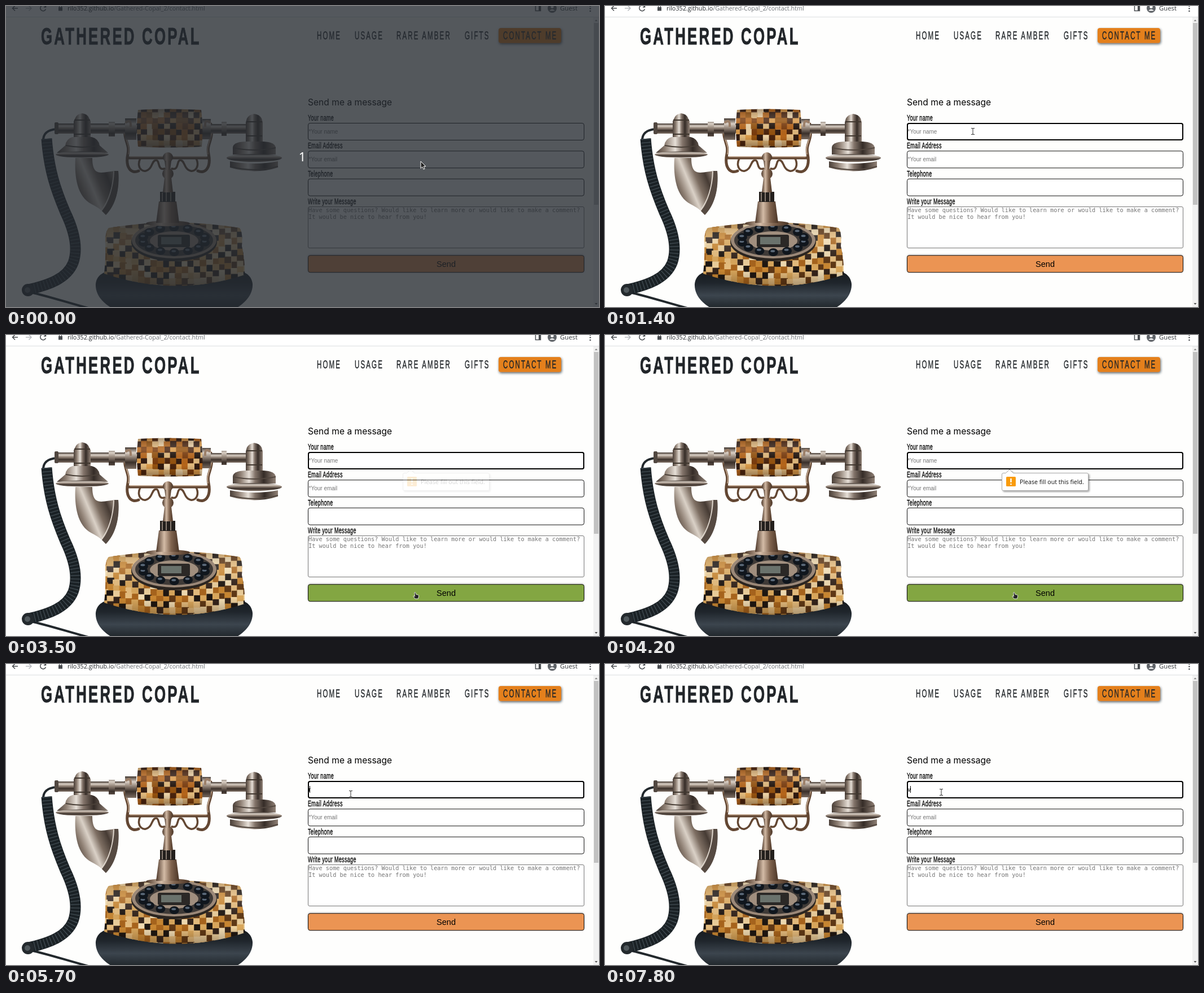
These frames come from a looping animation (1051 px wide and 533 px high, 8000 ms). An HTML page:

```html
<!DOCTYPE html>
<html lang="en">
<head>
<meta charset="utf-8">
<title>Contact form</title>
<style>
  html, body { margin: 0; width: 100%; height: 100%; overflow: hidden; background: #fefefd; }
  svg { display: block; }
  text { white-space: pre; }
  .ui { font-family: "Open Sans", "Noto Sans", sans-serif; }
  .sans { font-family: "Liberation Sans", Arial, sans-serif; }
  .hint { font-size: 10px; fill: #757575; }
  .mono { font: 10.26px "DejaVu Sans Mono", monospace; fill: #757575; }
  /* condensed display face */
  .narrow {
    font-family: "Liberation Sans", Arial, sans-serif;
    transform-box: fill-box; transform-origin: 0 50%; transform: scaleX(.6);
  }
  .label { font-size: 15px; letter-spacing: .55px; stroke: #000; stroke-width: .35px; }
  .nav { font-size: 19.3px; letter-spacing: 3.5px; fill: #212529; stroke: #212529; stroke-width: .4px; }
  .brand { font-size: 43px; font-weight: 700; letter-spacing: 5.4px; fill: #212529; stroke: #212529; stroke-width: 1px; }
  .field { fill: #fff; stroke: #111; }
</style>
</head>
<body>
<svg id="stage" width="1051" height="533" viewBox="0 0 1051 533" xmlns="http://www.w3.org/2000/svg">
  <defs>
    <linearGradient id="steel" x2="0" y2="1">
      <stop offset="0" stop-color="#40362f"/><stop offset=".25" stop-color="#d8cec4"/>
      <stop offset=".45" stop-color="#95867a"/><stop offset=".7" stop-color="#3a302a"/><stop offset="1" stop-color="#7d6e63"/>
    </linearGradient>
    <linearGradient id="column">
      <stop offset="0" stop-color="#4a3f38"/><stop offset=".18" stop-color="#8d7e72"/><stop offset=".38" stop-color="#e6dfd7"/>
      <stop offset=".52" stop-color="#83746a"/><stop offset=".72" stop-color="#352c27"/><stop offset="1" stop-color="#908176"/>
    </linearGradient>
    <linearGradient id="horn" x1="0" y1=".7" x2=".9" y2=".2">
      <stop offset="0" stop-color="#3b322c"/><stop offset=".22" stop-color="#8b7c70"/><stop offset=".42" stop-color="#dad1c7"/>
      <stop offset=".6" stop-color="#7d6e62"/><stop offset=".8" stop-color="#463b34"/><stop offset="1" stop-color="#a09185"/>
    </linearGradient>
    <linearGradient id="bronze">
      <stop offset="0" stop-color="#4b3628"/><stop offset=".35" stop-color="#d3bba6"/>
      <stop offset=".65" stop-color="#80644f"/><stop offset="1" stop-color="#4a3526"/>
    </linearGradient>
    <linearGradient id="shade" x2="0" y2="1">
      <stop offset="0" stop-color="#1a0c04" stop-opacity=".3"/><stop offset=".3" stop-color="#fff" stop-opacity=".16"/>
      <stop offset=".7" stop-color="#1a0c04" stop-opacity="0"/><stop offset="1" stop-color="#1a0c04" stop-opacity=".4"/>
    </linearGradient>
    <linearGradient id="base" x2="0" y2="1">
      <stop offset="0" stop-color="#13171b"/><stop offset=".4" stop-color="#1f252b"/>
      <stop offset=".7" stop-color="#3c454e"/><stop offset="1" stop-color="#20262b"/>
    </linearGradient>
    <filter id="soft" x="-20%" y="-50%" width="140%" height="220%"><feDropShadow dx="1" dy="2" stdDeviation="2.200" flood-color="#1c2730" flood-opacity=".75"/></filter>
    <filter id="faint" x="-10%" y="-30%" width="120%" height="180%"><feDropShadow dx="2" dy="2" stdDeviation="1.5" flood-opacity=".35"/></filter>
    <filter id="glow" x="-2%" y="-30%" width="104%" height="160%"><feDropShadow dx="0" dy="-1" stdDeviation="1.500" flood-opacity=".22"/></filter>
    <clipPath id="gripClip"><path d="M234 184Q290 181 346 184Q350 216 347 249Q290 252 234 249Q230 216 234 184Z"/></clipPath>
    <clipPath id="bodyClip"><path d="M182 393Q298 374 414 393Q420 400 418 425Q424 450 423 476Q300 516 174 474Q177 448 176 425Q175 400 182 393Z"/></clipPath>
    <path id="coil" d="M72 235C76 290 88 325 105 365C122 400 128 430 119 455C108 482 78 494 36 503"/>
  </defs>

  <rect width="1051" height="533" fill="#fefefd"/>

  <!-- browser bar -->
  <rect width="1051" height="19" fill="#fff"/>
  <path d="M0 19.500H1051" stroke="#dcdee1"/>
  <g fill="none" stroke="#4a4d51" stroke-width="1.5">
    <path d="M21 4H11.500M16 -.5L11.500 4L16 8.500"/>
    <path d="M35 4H45M40.500 -.5L45 4L40.500 8.500" stroke="#b9bcc0"/>
    <path d="M70 1A5 5 0 1 0 70.500 5.500M70.500 -1V2H67"/>
    <rect x="938.500" y="-2" width="9" height="10.500"/>
  </g>
  <path d="M944 -2H948V8H944Z M93 2H100V8.500H93Z" fill="#4a4d51"/>
  <path d="M94.500 2V-2H98.500V2" fill="none" stroke="#4a4d51"/>
  <circle cx="968" cy="4" r="8" fill="#5f6368"/>
  <circle cx="968" cy="1.500" r="2.600" fill="#fff"/><path d="M963 8.500Q968 3 973 8.500Z" fill="#fff"/>
  <g fill="#4a4d51"><circle cx="1035.500" cy="0" r="1.300"/><circle cx="1035.500" cy="4.500" r="1.300"/><circle cx="1035.500" cy="9" r="1.300"/></g>
  <text class="ui" x="109" y="8" font-size="10.8" fill="#25282c">rilo352.github.io<tspan fill="#6b6f74">/Gathered-Copal_2/contact.html</tspan></text>
  <text class="ui" x="982" y="8" font-size="11.3" fill="#33363a">Guest</text>
  <rect x="1041" y="20" width="10" height="513" fill="#f1f1f1"/>
  <rect x="1042" y="30" width="8" height="322" fill="#c1c1c1"/>
  <path d="M1043.500 27L1046 24L1048.500 27Z" fill="#8a8a8a"/><path d="M1043.500 526L1046 529L1048.500 526Z" fill="#505050"/>

  <!-- header -->
  <text class="narrow brand" x="62" y="68.500">GATHERED COPAL</text>
  <rect x="873" y="39" width="111" height="26.500" rx="4" fill="#e4801c" filter="url(#soft)"/>
  <text class="narrow nav" x="551" y="59">HOME</text>
  <text class="narrow nav" x="618" y="59">USAGE</text>
  <text class="narrow nav" x="692" y="59">RARE AMBER</text>
  <text class="narrow nav" x="813" y="59">GIFTS</text>
  <text class="narrow nav" x="881" y="59">CONTACT ME</text>

  <!-- telephone -->
  <g id="phone">
    <g fill="none" stroke-linecap="round" stroke="#22282c" stroke-width="4">
      <path d="M90 218C76 219 65 224 66 240"/>
      <path d="M44 507C75 514 105 524 146 535"/>
    </g>
    <g fill="none">
      <use href="#coil" stroke="#1a2125" stroke-width="19"/>
      <use href="#coil" stroke="#3d474d" stroke-width="17" stroke-dasharray="1.500 4.500"/>
    </g>
    <circle cx="39" cy="503" r="11" fill="#23292d"/><circle cx="38" cy="503" r="5" fill="#50585c"/>

    <path d="M159 492C162 470 180 461 298 460S434 470 437 492C438 510 425 525 408 535H188C170 525 158 510 159 492Z" fill="url(#base)"/>
    <g clip-path="url(#bodyClip)"><g id="bodyTiles"></g><rect x="170" y="375" width="260" height="130" fill="url(#shade)"/></g>

    <ellipse cx="298" cy="418" rx="76" ry="34" fill="#2b2520"/>
    <ellipse cx="298" cy="415" rx="75" ry="32" fill="#9b8878"/>
    <ellipse cx="298" cy="415" rx="69" ry="28" fill="#3f3a37"/>
    <ellipse cx="298" cy="416" rx="43" ry="17" fill="#a08e7e"/>
    <rect x="269" y="405" width="57" height="22" rx="3" fill="#2b2826"/>
    <rect x="275" y="409" width="36" height="13" fill="#6a726c"/>
    <g id="keys"></g>

    <ellipse cx="287" cy="385" rx="39" ry="5" fill="url(#bronze)"/>
    <path d="M271 346H302L307 384H266Z" fill="url(#bronze)"/>
    <path d="M273 329H300V347H273Z" fill="#231f1c"/>
    <path d="M277 330V346M284 330V346M292 330V346" stroke="#8a7e74" stroke-width="2"/>
    <path d="M281 304H293L296 330H278Z" fill="url(#bronze)"/>
    <g fill="none" stroke="#634733" stroke-width="5" stroke-linecap="round">
      <g id="cradle">
        <path d="M212 209C206 238 220 242 216 262C211 286 222 298 235 292"/>
        <path d="M216 269H280"/>
        <path d="M238 270C229 288 246 300 256 286C260 279 261 273 266 273C273 273 268 292 281 288" stroke-width="3.500"/>
        <path d="M212 211C207 236 221 243 217 262M220 267H278" stroke="#c9ad94" stroke-width="1.600"/>
      </g>
      <use href="#cradle" transform="matrix(-1 0 0 1 575 0)"/>
    </g>
    <circle cx="287" cy="268" r="9" fill="url(#bronze)"/><circle cx="287" cy="297" r="10" fill="url(#bronze)"/>
    <path d="M281 274H293L291 290H283Z" fill="url(#bronze)"/>

    <rect x="88" y="208" width="146" height="18" rx="4" fill="url(#steel)"/>
    <rect x="86" y="206" width="7" height="21" rx="2" fill="#514740"/>
    <rect x="346" y="209" width="84" height="17" rx="3" fill="url(#steel)"/>
    <path d="M182 205H193V231H182ZM211 199H231V237H211ZM348 200H363V236H348ZM382 205H391V230H382Z" fill="url(#steel)"/>
    <path d="M123 198Q126 191 135 190Q144 191 147 198L150 204V234H120V204Z" fill="url(#column)"/>
    <path d="M121 202H149M120 227H150" stroke="#40372f" stroke-width="2"/>
    <path d="M118 232H152Q164 235 166 247Q174 254 181 260H90Q97 254 105 247Q107 235 118 232Z" fill="url(#column)"/>
    <path d="M106 247Q135 253 165 247" fill="none" stroke="#4a4038" stroke-width="2"/>
    <ellipse cx="135" cy="263" rx="47" ry="5.500" fill="url(#steel)"/>
    <path d="M123 269C121 302 126 338 152 351C164 357 170 362 177 370C194 353 201 325 199 292C185 291 167 299 159 292C154 287 153 278 153 269Z" fill="url(#horn)"/>
    <path d="M192 292C192 320 184 347 170 363L177 370C194 353 202 325 199 292Z" fill="#564a42"/>
    <path d="M191 293C190 321 182 346 169 362" fill="none" stroke="#e0d8cf" stroke-width="1.800"/>

    <path d="M427 199Q431 192 440 191Q449 192 453 199L455 206V242H425V206Z" fill="url(#column)"/>
    <path d="M426 205H454M426 230H454" stroke="#40372f" stroke-width="2"/>
    <path d="M402 251Q402 241 424 240H456Q477 241 478 251V263H402Z" fill="url(#column)"/>
    <ellipse cx="440" cy="269" rx="49" ry="7" fill="url(#steel)"/>
    <path d="M397 275Q440 283 482 275V286Q440 299 397 286Z" fill="url(#column)"/>
    <path d="M402 251Q440 259 478 251M397 284Q440 296 482 284" fill="none" stroke="#52473f" stroke-width="2"/>
    <g clip-path="url(#gripClip)"><g id="gripTiles"></g><rect x="230" y="182" width="120" height="70" fill="url(#shade)"/></g>
    <path d="M212 207Q222 198 221 214M362 207Q352 198 353 214" fill="none" stroke="#9c7f68" stroke-width="4"/>
  </g>

  <!-- form -->
  <text x="535" y="176" font-family="Inter, sans-serif" font-size="15.6">Send me a message</text>
  <text class="narrow label" x="535" y="203.500">Your name</text>
  <text class="narrow label" x="535" y="252.500">Email Address</text>
  <text class="narrow label" x="535" y="302">Telephone</text>
  <text class="narrow label" x="535" y="351">Write your Message</text>
  <rect class="field" x="535.500" y="207.500" width="489" height="30" rx="3.500"/>
  <rect id="focusRing" x="536" y="208" width="488" height="29" rx="3" fill="#fff" stroke="#000" stroke-width="2"/>
  <rect class="field" x="535.500" y="256.800" width="489" height="30" rx="3.500"/>
  <rect class="field" x="535.500" y="306.200" width="489" height="30" rx="3.500"/>
  <rect x="535.500" y="355.500" width="489" height="73" rx="2.500" fill="#fff" stroke="#767676"/>
  <text id="nameText" class="sans" x="536.500" y="226" font-size="10"></text>
  <path id="caret" d="M0 216V228" stroke="#000"/>
  <text class="sans hint" x="536.500" y="275">*Your email</text>
  <text class="mono" x="536" y="365">Have some questions? Would like to learn more or would like to make a comment?</text>
  <text class="mono" x="536" y="376.500">It would be nice to hear from you!</text>
  <rect id="send" x="535.500" y="441.700" width="489" height="30" rx="3.500" stroke="#111" filter="url(#glow)"/>
  <text class="sans" x="780" y="461.500" font-size="14.6" text-anchor="middle">Send</text>

  <g id="bubble">
    <path d="M706 244.500H710.500L717 238L723.500 244.500H854Q856.500 244.500 856.500 247V273Q856.500 275.500 854 275.500H706Q703.500 275.500 703.500 273V247Q703.500 244.500 706 244.500Z" fill="#fff" stroke="#a6a6a6" filter="url(#faint)"/>
    <rect x="711" y="251" width="17" height="17" rx="1.500" fill="#f99b0c"/>
    <path d="M718.300 254H720.700V261H718.300ZM718.300 263H720.700V265.300H718.300Z" fill="#fff"/>
    <text class="ui" x="735" y="263.500" font-size="10.65" fill="#111">Please fill out this field.</text>
  </g>

  <g id="countdown">
    <rect width="1051" height="533" fill="#242a30" opacity=".78"/>
    <text x="525" y="275" font-family="'Noto Sans', sans-serif" font-size="22" fill="#fff" text-anchor="middle">1</text>
  </g>

  <!-- pointers, each with its hot spot at 0,0 -->
  <path id="arrow" d="M0 0V12.500L3 9.800L5 14.200L7.200 13.200L5.200 9H9Z" fill="#222" stroke="#fff"/>
  <g id="beam" fill="none">
    <path d="M-3 -5.500H-1Q0 -5.500 0 -4.500Q0 -5.500 1 -5.500H3M0 -5V5M-3 5.500H-1Q0 5.500 0 4.500Q0 5.500 1 5.500H3" stroke="#fff" stroke-width="2.200"/>
    <path d="M-3 -5.500H-1Q0 -5.500 0 -4.500Q0 -5.500 1 -5.500H3M0 -5V5M-3 5.500H-1Q0 5.500 0 4.500Q0 5.500 1 5.500H3" stroke="#333"/>
  </g>
  <path id="hand" d="M-2 -4Q-.8 -5 0 -3.500L1 -.5L4.500 .2Q6 .8 5.500 3L4.500 7H-1L-4 3Q-4.500 1.500 -3 2L-1.500 3Z" fill="#222" stroke="#fff" stroke-width=".8"/>
</svg>
<script>
const $ = id => document.getElementById(id);
const LOOP = 8000, STEP = 100;

function seeded(seed) {
  return () => (seed = (seed * 16807) % 2147483647) / 2147483647;
}

function make(parent, tag, attrs) {
  const node = document.createElementNS("http://www.w3.org/2000/svg", tag);
  for (const key in attrs) node.setAttribute(key, attrs[key]);
  parent.appendChild(node);
}

// rows of tiles, dark and light by turns, sagging by `bend` along the curved surface
function mosaic(id, x0, y0, cols, rows, w, h, bend, dark, light, seed) {
  const random = seeded(seed);
  const jitter = () => (random() - .5) * 2;
  for (let row = 0; row < rows; row++) {
    for (let col = 0; col < cols; col++) {
      const u = (2 * col + 1) / cols - 1;
      const colors = (row + col) % 2 && random() < .85 ? dark : light;
      make($(id), "rect", {
        x: x0 + col * w + jitter(),
        y: y0 + row * h + bend * (1 - u * u) + jitter(),
        width: w + 1.5, height: h + 1.5,
        fill: colors[Math.floor(random() * colors.length)]
      });
    }
  }
}

mosaic("gripTiles", 228, 178, 12, 8, 10.5, 10, 0,
  ["#1f120b", "#4a230c", "#7a3b0c", "#301a10"], ["#b5651a", "#d99a4a", "#ecd2a6", "#94520f", "#e0b87c"], 41);
mosaic("bodyTiles", 168, 364, 24, 13, 11, 10.5, 14,
  ["#1d1611", "#5f3815", "#a8641c", "#33231a"], ["#c98732", "#e6bd7e", "#f1dcb2", "#eccf9c", "#d9a75c"], 97);

for (let i = 0; i < 14; i++) {
  const a = i / 14 * 2 * Math.PI + .22;
  const cx = 298 + 56 * Math.cos(a), cy = 414 + 22 * Math.sin(a);
  make($("keys"), "ellipse", { cx, cy, rx: 8.5, ry: 7, fill: "#10161d" });
  make($("keys"), "ellipse", { cx: cx - 1, cy: cy - 2, rx: 4, ry: 2, fill: "#5a6878" });
}

// pointer path: time, x, y
const path = [
  [0, 735, 275], [300, 735, 275], [1000, 652, 222], [1900, 652, 222],
  [2400, 615, 296], [2800, 650, 352], [2900, 703, 428], [3000, 722, 456],
  [3100, 726, 460], [4200, 726, 460], [4800, 640, 182], [5100, 612, 228],
  [5300, 612, 230], [5400, 611, 230], [6000, 611, 230], [6200, 605, 221],
  [6400, 596, 227], [LOOP, 596, 227]
];

function pointerAt(t) {
  const i = path.findIndex(p => p[0] > t);
  const [t0, x0, y0] = path[i - 1], [t1, x1, y1] = path[i];
  const k = (t - t0) / (t1 - t0);
  return [x0 + (x1 - x0) * k, y0 + (y1 - y0) * k];
}

const clamp = v => Math.max(0, Math.min(1, v));
const within = (t, from, to) => t >= from && t < to;

function show(id, visible) {
  $(id).style.display = visible ? "" : "none";
}

function setPointer(t) {
  const [x, y] = pointerAt(t);
  const overSend = y > 441;
  const kind = t < 100 || y < 207 ? "arrow" : overSend ? "hand" : "beam";
  for (const id of ["arrow", "beam", "hand"]) show(id, id === kind);
  $(kind).setAttribute("transform", `translate(${x} ${y})`);
  $("send").setAttribute("fill", overSend ? "#83a643" : "#eb9453");
}

function setName(t) {
  const typed = within(t, 5600, 6900) ? "r" : t >= 7800 ? "v" : "";
  const field = $("nameText");
  field.textContent = typed || "*Your name";
  field.setAttribute("fill", typed ? "#000" : "#757575");
  show("caret", typed && !within(t, 6100, 6700));
  $("caret").setAttribute("transform", `translate(${typed === "v" ? 541.5 : 538.5} 0)`);
}

function render(t) {
  const pressing = within(t, 3400, 3500);
  show("countdown", t < 100);
  show("focusRing", t >= 1400 && !pressing);
  $("send").setAttribute("stroke-width", pressing ? 2 : 1);
  setPointer(t);
  setName(t);
  $("bubble").setAttribute("opacity", clamp((t - 3400) / 600) * clamp((5700 - t) / 200));
}

const start = performance.now();
function tick() {
  const t = (performance.now() - start) % LOOP;
  render(Math.floor(t / STEP) * STEP);
  requestAnimationFrame(tick);
}
tick();
</script>
</body>
</html>
```
